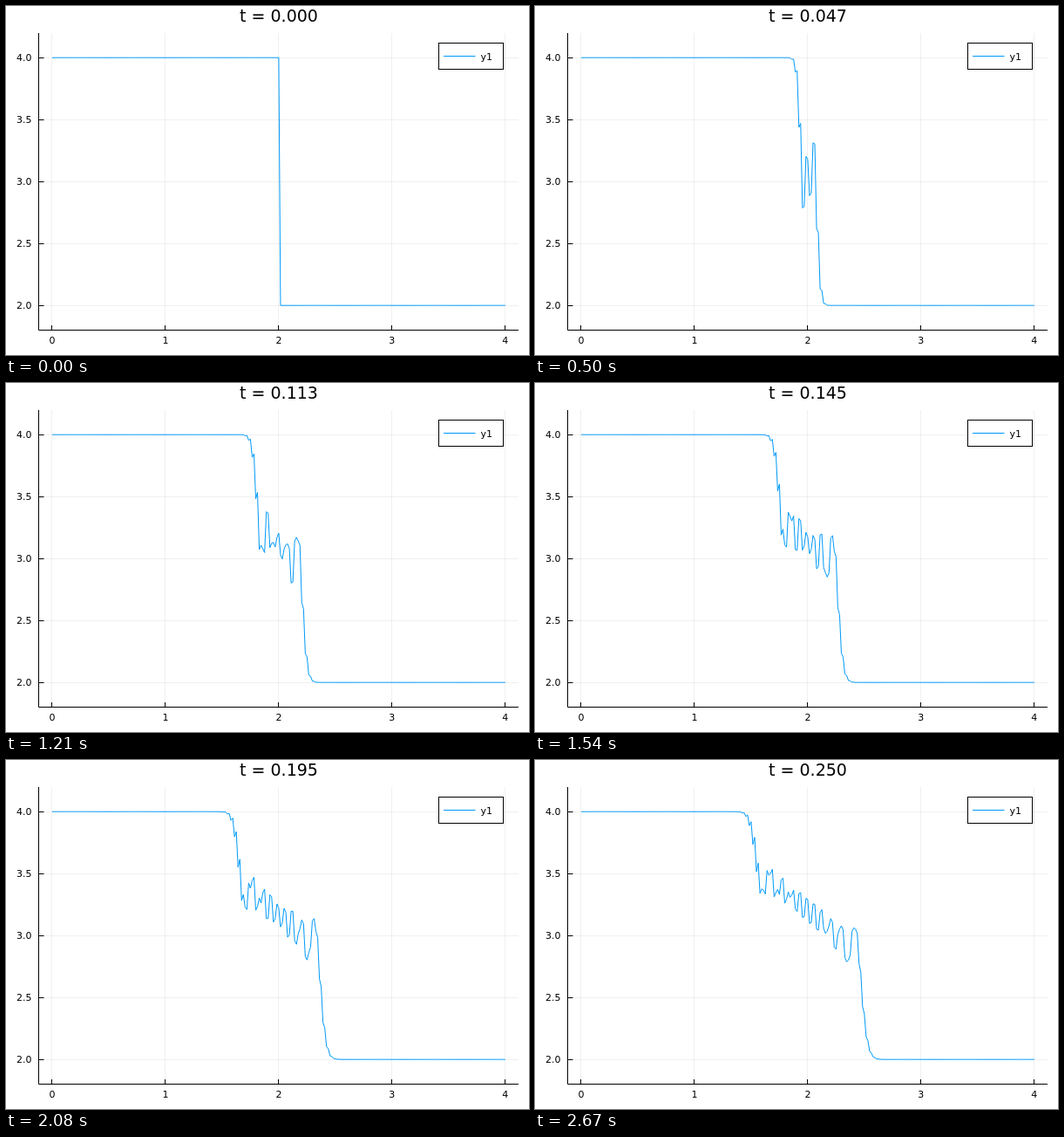
Write an HTML page that moves like this. It is 600x400 px and loops after 2.71 s.

```html
<!DOCTYPE html>
<html lang="en">
<head>
<meta charset="utf-8">
<title>Relaxation system</title>
<style>
  html, body { margin: 0; width: 100%; height: 100%; overflow: hidden; background: #fff; }
  svg { display: block; }
  text { font: 11px "DejaVu Sans", sans-serif; }
  .title { font-size: 19px; }
  path, rect { fill: none; stroke: #000; }
  .grid { stroke: rgba(0, 0, 0, .06); }
  .blue { stroke: #009afa; stroke-linejoin: round; }
</style>
</head>
<body>
<svg id="plot" width="600" height="400" viewBox="0 0 600 400"></svg>
<script>
const LEFT = 37.5, RIGHT = 588, TOP = 31, BOTTOM = 371.5;
const STEPS = 64, LOOP = 2710, DT = 1 / 256, CELLS = 256, DX = 4 / CELLS;
const px = x => 53.1 + 129.9 * x;
const py = y => 343.2 - 142 * (y - 2);
const crisp = p => Math.floor(p) + 0.5;
const svg = document.getElementById('plot');

function add(tag, attrs, text = '') {
  const el = document.createElementNS('http://www.w3.org/2000/svg', tag);
  for (const name in attrs) el.setAttribute(name, attrs[name]);
  el.textContent = text;
  return svg.appendChild(el);
}

// u_t + v_x = 0,  v_t + 4 u_x = 4 (u - v), central differences
function rate({ u, v }) {
  const slope = (a, i) => (a[Math.min(i + 1, CELLS)] - a[Math.max(i - 1, 0)]) / (2 * DX);
  return {
    u: u.map((_, i) => -slope(v, i)),
    v: v.map((_, i) => -4 * slope(u, i) + 4 * (u[i] - v[i]))
  };
}

const shift = (s, k, h) => ({
  u: s.u.map((a, i) => a + h * k.u[i]),
  v: s.v.map((a, i) => a + h * k.v[i])
});

function rk4(s) {
  const a = rate(s);
  const b = rate(shift(s, a, DT / 2));
  const c = rate(shift(s, b, DT / 2));
  const d = rate(shift(s, c, DT));
  return [[a, 1], [b, 2], [c, 2], [d, 1]]
    .reduce((sum, [k, weight]) => shift(sum, k, weight * DT / 6), s);
}

const toPath = u => 'M' + u.map((y, i) => px(i * DX).toFixed(2) + ',' + py(y).toFixed(2)).join('L');

// Three decimals, ties to even
function timeLabel(n) {
  const x = n * DT * 1000;
  let r = Math.round(x);
  if (r - x === 0.5 && r % 2) r--;
  return 't = ' + (r / 1000).toFixed(3);
}

let state = {
  u: Array.from({ length: CELLS + 1 }, (_, i) => i <= CELLS / 2 ? 4 : 2),
  v: Array(CELLS + 1).fill(0)
};
const curves = [toPath(state.u)];
while (curves.length <= STEPS) {
  state = rk4(state);
  curves.push(toPath(state.u));
}

let grid = '', axes = `M${LEFT},${TOP}V${BOTTOM}H${RIGHT}`;
for (let x = 0; x <= 4; x++) {
  const p = crisp(px(x) - 0.3);
  grid += `M${p},${TOP}V${BOTTOM}`;
  axes += `M${p},${BOTTOM}v-5.5`;
  add('text', { x: px(x), y: 387, 'text-anchor': 'middle' }, x);
}
for (let y = 2; y <= 4; y += 0.5) {
  const p = crisp(py(y));
  grid += `M${LEFT},${p}H${RIGHT}`;
  axes += `M${LEFT},${p}h6`;
  add('text', { x: 29.5, y: py(y) + 4, 'text-anchor': 'end' }, y.toFixed(1));
}
add('path', { class: 'grid', d: grid });
add('path', { d: axes });
const curve = add('path', { class: 'blue' });
const title = add('text', { class: 'title', x: 313, y: 18, 'text-anchor': 'middle' });
add('rect', { x: 496.5, y: 42.5, width: 74, height: 30, style: 'fill:#fff' });
add('path', { class: 'blue', d: 'M502,57.5H538.5' });
add('text', { x: 544.5, y: 61.5 }, 'y1');

// 24 steps per second, switching on whole hundredths
function draw(now) {
  const time = Math.floor(now % LOOP / 10) * 10;
  const n = Math.min(STEPS, Math.floor((time + 4.9) * 0.024));
  curve.setAttribute('d', curves[n]);
  title.textContent = timeLabel(n);
}

const start = performance.now();
function tick() {
  draw(performance.now() - start);
  requestAnimationFrame(tick);
}
tick();
</script>
</body>
</html>
```
